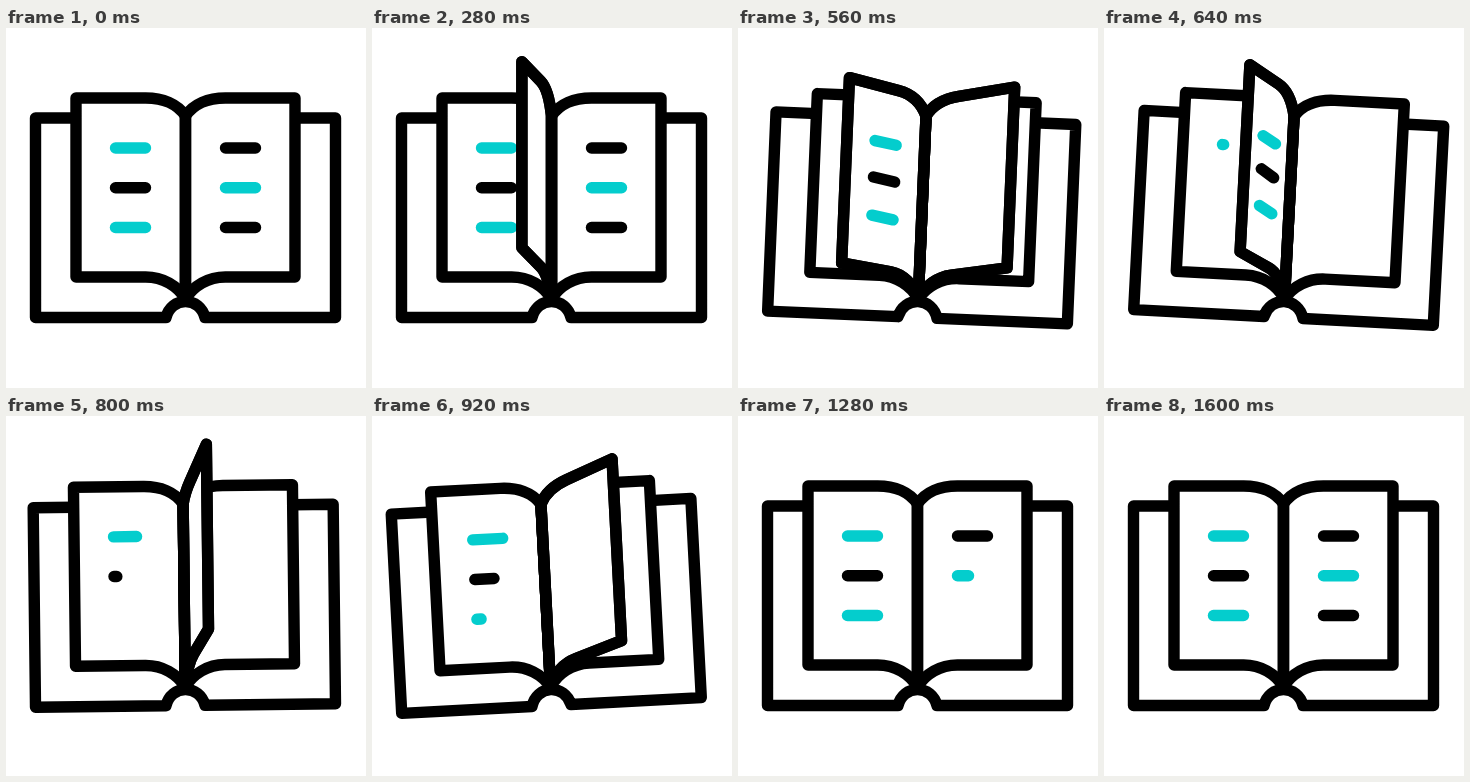
Write an HTML page that moves like this. It is 360 px wide and 360 px high and loops after 2000 ms.

```html
<!DOCTYPE html>
<html lang="en">
<head>
<meta charset="utf-8">
<title>Book</title>
<style>
  html, body { margin: 0; width: 100%; height: 100%; overflow: hidden; background: #fff; }
  svg { display: block; width: 100%; height: 100%; }
  path { fill: none; stroke: #000; stroke-width: 11.4; stroke-linecap: round; stroke-linejoin: round; }
  .page { fill: #fff; }
</style>
</head>
<body>
<svg viewBox="0 0 360 360">
  <g id="book">
    <path d="M-109 90H-150V289.5H-19.5C-17 279.500 -9 273.500 0 273.500S17 279.500 19.500 289.500H150V90H109"/>
    <path class="page" id="left"/>
    <path class="page" id="right"/>
    <g id="lines"></g>
    <g id="flips"></g>
    <path d="M0 88V271"/>
  </g>
</svg>
<script>
const LOOP = 2000, HALF = 109.5, CYAN = '#04cdcd', BLACK = '#000';
const byId = id => document.getElementById(id);
const clamp = v => Math.max(0, Math.min(1, v));
const smooth = p => p * p * (3 - 2 * p);

function addPath(parent, cls) {
  const el = document.createElementNS('http://www.w3.org/2000/svg', 'path');
  if (cls) el.setAttribute('class', cls);
  parent.appendChild(el);
  return el;
}

function addLine(parent, color) {
  const el = addPath(parent);
  el.style.stroke = color;
  return el;
}

function show(el, on) {
  el.style.display = on ? '' : 'none';
}

// Page edge offset, then heights: top corner, top bend, bottom corner, bottom bend
const poses = [
  [-HALF, 70, 70, 249, 249],
  [-75, 51, 63, 237, 244.5],
  [-48, 39.2, 57, 226.4, 241],
  [-31, 34, 53, 220, 239],
  [0, 26.5, 57, 213, 237.5],
  [23, 28.2, 62, 213.2, 238],
  [40, 32.8, 61, 214.8, 240],
  [75, 47, 65, 229, 244],
  [HALF, 70, 70, 249, 249]
];

function poseAt(x) {
  let i = 1;
  while (i < poses.length - 1 && poses[i][0] < x) i++;
  const a = poses[i - 1], b = poses[i];
  const p = clamp((x - a[0]) / (b[0] - a[0]));
  return a.map((v, k) => v + (b[k] - v) * p);
}

function pagePath(x) {
  const [, top, topBend, low, lowBend] = poseAt(x);
  const k = x * 0.364;
  const ty = topBend + (topBend - top) * 0.246;
  const by = lowBend + (lowBend - low) * 0.246;
  return `M0 88C${k * 0.2} ${88 - (88 - ty) * 0.67} ${k * 0.57} ${ty} ${k} ${topBend}` +
    `L${x} ${top}V${low}L${k} ${lowBend}` +
    `C${k * 0.57} ${by} ${k * 0.2} ${271 - (271 - by) * 0.6} 0 271Z`;
}

const rows = [120, 159.7, 199.5];
const lines = [
  [-70, CYAN, 632], [-70, BLACK, 780], [-70, CYAN, 890],
  [40, BLACK, 1034], [40, CYAN, 1200], [40, BLACK, 1370]
].map(([x, color, start], i) => ({
  x, start, y: rows[i % 3],
  hide: i < 3 ? 455 : 620,
  el: addLine(byId('lines'), color)
}));

const flips = [55, 455].map((start, i) => {
  const group = byId('flips');
  const page = addPath(group, 'page');
  const marks = i ? [CYAN, BLACK, CYAN].map(c => addLine(group, c)) : [];
  return { start, page, marks, edge: addPath(group) };
});

function drawLine(line, t) {
  const grow = t < line.hide ? 1 : clamp((t - line.start) / 220);
  show(line.el, grow > 0);
  line.el.setAttribute('d', `M${line.x} ${line.y}h${Math.max(0.01, 30 * grow)}`);
}

function drawFlip(flip, t) {
  const p = (t - flip.start) / 585;
  const on = p > 0 && p < 1;
  show(flip.page, on);
  show(flip.edge, on);
  const x = HALF * (2 * (0.6 * p + 0.4 * smooth(clamp(p))) - 1);
  if (on) {
    const d = pagePath(x);
    flip.page.setAttribute('d', d);
    flip.edge.setAttribute('d', d);
  }
  const u = -x / HALF, lift = (1 - u) / 0.564;
  flip.marks.forEach((el, i) => {
    show(el, on && x < -20);
    const y1 = rows[i] - lift * [10.8, 17.3, 20.3][i];
    const y2 = rows[i] - lift * [3.4, 9, 12.8][i];
    el.setAttribute('d', `M${-70 * u} ${y1}L${-40 * u} ${y2}`);
  });
}

function tilt(t) {
  const part = start => smooth(clamp((t - start) / 280));
  return 3 * part(360) - 6 * part(640) + 3 * part(920);
}

function draw(t) {
  byId('book').setAttribute('transform', `translate(179.5 0) rotate(${tilt(t)} 0 289.5)`);
  lines.forEach(line => drawLine(line, t));
  flips.forEach(flip => drawFlip(flip, t));
}

byId('left').setAttribute('d', pagePath(-HALF));
byId('right').setAttribute('d', pagePath(HALF));

const begin = performance.now();
function tick() {
  draw((performance.now() - begin) % LOOP);
  requestAnimationFrame(tick);
}
tick();
</script>
</body>
</html>
```
